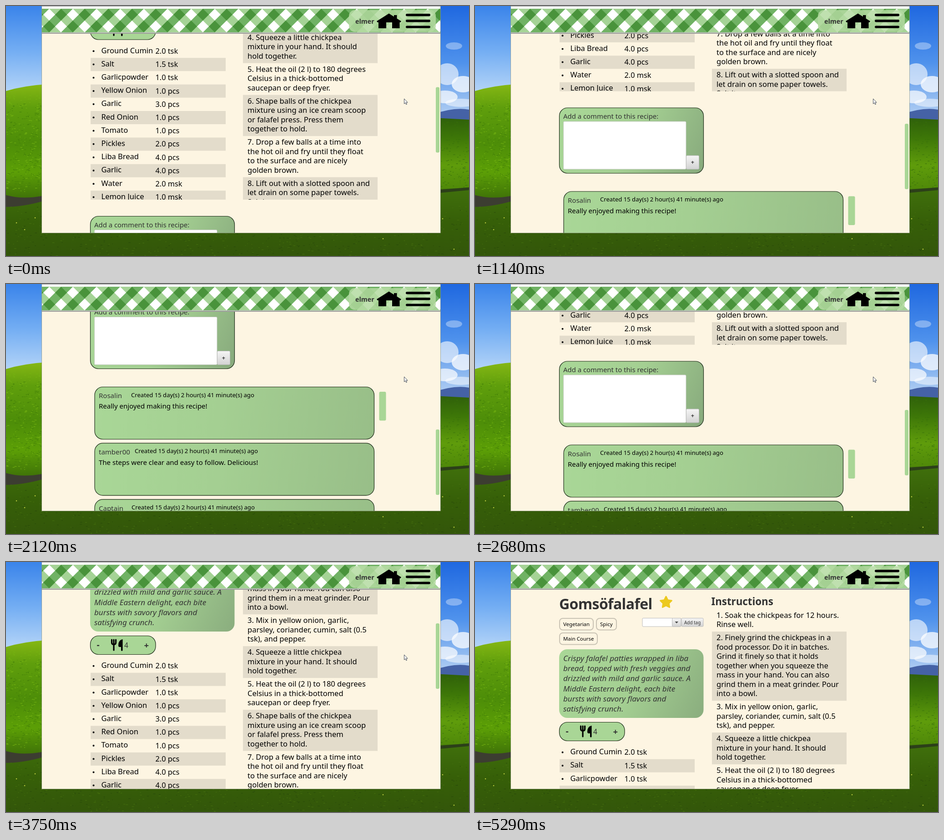
Recreate the animation shown at these times as an HTML page. Size 1018x550 px, loop 6.1 s.

```html
<!DOCTYPE html>
<html lang="en">
<head>
<meta charset="utf-8">
<title>Recipe page</title>
<style>
html, body { margin: 0; width: 100%; height: 100%; overflow: hidden; }
svg { display: block; }
text { font-family: "Noto Sans", "Open Sans", sans-serif; white-space: pre; }
.soft { fill: #333; }
.bold { font-weight: 700; fill: #333; }
.italic { font-style: italic; fill: #333; }
.card { stroke: #1c2a18; stroke-width: 1.2; }
.weave { mix-blend-mode: multiply; fill: none; stroke-width: 18.4; }
</style>
</head>
<body>
<svg id="stage" width="1018" height="550" viewBox="0 0 1018 550">
  <defs>
    <linearGradient id="skyL" x2="0" y2="1"><stop stop-color="#3a84ea"/><stop offset=".5" stop-color="#74aef3"/><stop offset="1" stop-color="#bcd9f8"/></linearGradient>
    <linearGradient id="skyR" x2="0" y2="1"><stop stop-color="#1f68e0"/><stop offset=".5" stop-color="#4f92ec"/><stop offset="1" stop-color="#b9d3f3"/></linearGradient>
    <linearGradient id="hillL" x2="0" y2="1"><stop stop-color="#86b814"/><stop offset=".2" stop-color="#5f9e0c"/><stop offset=".5" stop-color="#4d8d08"/><stop offset=".75" stop-color="#5c9f06"/><stop offset="1" stop-color="#3c6d08"/></linearGradient>
    <linearGradient id="hillR" x2="0" y2="1"><stop stop-color="#2f600a"/><stop offset=".25" stop-color="#3d7608"/><stop offset=".6" stop-color="#5f9c0b"/><stop offset="1" stop-color="#4a8208"/></linearGradient>
    <linearGradient id="field" x2="0" y2="1"><stop stop-color="#40700c"/><stop offset=".5" stop-color="#365f08"/><stop offset="1" stop-color="#33560a"/></linearGradient>
    <linearGradient id="button" x2="0" y2="1"><stop stop-color="#f5f5f5"/><stop offset="1" stop-color="#d3d3d3"/></linearGradient>
    <clipPath id="view"><path d="M79 61H955V499H79z"/></clipPath>
    <clipPath id="lists"><path d="M79 0H955V745.5H79z"/></clipPath>
  </defs>
  <g id="desk"></g>
  <path d="M79 0H955V499H79z" fill="#fdf5e2"/>
  <g clip-path="url(#view)">
    <g id="page"></g>
    <rect id="thumb" x="945" width="8" height="144" rx="3" fill="#a9d696"/>
  </g>
  <g id="header"></g>
  <path d="M78.5 0V499.5H955.5V0" fill="none" stroke="#8d9682" stroke-opacity=".7"/>
  <path id="cursor" d="M0 0V11.2L2.6 8.8L4.3 12.8L6 12L4.3 8.2H7.6z" fill="#fff" stroke="#333a48" stroke-width=".9"/>
</svg>
<script>
const $ = id => document.getElementById(id);
const text = (x, y, size, str, cls = '', more = '') =>
  `<text x="${x}" y="${y}" font-size="${size}" class="${cls}" ${more}>${str}</text>`;
const box = (x, y, w, h, r, fill, more = '') =>
  `<rect x="${x}" y="${y}" width="${w}" height="${h}" rx="${r}" fill="${fill}" ${more}/>`;

let gradients = 0;
// Rounded card shaded from its top left to its bottom right corner
function card(x, y, w, h, r, dark, bend, more) {
  const id = 'shade' + gradients++;
  return `<linearGradient id="${id}" gradientUnits="userSpaceOnUse" x1="${x}" y1="${y}" x2="${x + w}" y2="${y + h}">
    <stop stop-color="#a9d797"/><stop offset="${bend}" stop-color="#a4cf92"/><stop offset="1" stop-color="${dark}"/>
    </linearGradient>` + box(x, y, w, h, r, `url(#${id})`, more);
}

function desk() {
  let seed = 7;
  const rnd = () => (seed = seed * 16807 % 2147483647) / 2147483647;
  const flecks = (n, x, y, w, h, color) => {
    let d = '';
    while (n--) d += `M${(x + rnd() * w).toFixed(1)} ${(y + rnd() * h).toFixed(1)}h${(1 + rnd() * 4).toFixed(1)}`;
    return `<path d="${d}" stroke="${color}" fill="none"/>`;
  };
  const puff = (x, y, rx, ry, o) => `<ellipse cx="${x}" cy="${y}" rx="${rx}" ry="${ry}" fill="#fff" opacity="${o}"/>`;
  return `<path d="M0 0H90V200H0z" fill="url(#skyL)"/><path d="M940 0H1018V250H940z" fill="url(#skyR)"/>`
    + puff(985, 88, 18, 8, .35) + puff(970, 150, 25, 24, .6) + puff(1005, 172, 25, 18, .75)
    + puff(965, 200, 28, 14, .7) + puff(1000, 213, 34, 9, .5)
    + `<path d="M940 238Q985 222 1018 228V270H940z" fill="#4562a6"/>
      <path d="M0 187Q40 175 90 172V430H0z" fill="url(#hillL)"/>
      <path d="M940 246L1018 250V420H940z" fill="url(#hillR)"/>
      <path d="M0 418Q45 430 90 418V410H940V403L1018 400V550H0z" fill="url(#field)"/>
      <path d="M0 416Q35 426 79 418V430Q35 442 0 442z" fill="#3c3d31"/>
      <path d="M955 404L1018 399V405L955 411z" fill="#2c3f19"/>`
    + flecks(220, 0, 215, 78, 200, '#437f08') + flecks(160, 0, 190, 78, 220, '#76b512')
    + flecks(120, 955, 255, 62, 145, '#38700a') + flecks(420, 0, 440, 1018, 110, '#28490a')
    + flecks(420, 0, 440, 1018, 110, '#456f0e')
    + [[23, 477], [41, 492], [64, 466], [960, 468], [829, 512], [985, 535]].map(([x, y]) =>
      `<circle cx="${x}" cy="${y}" r="1.3" fill="#b7c83d"/>`).join('');
}

function header() {
  // One period of the diagonal check is as wide as the band is high
  const period = 52;
  let down = '', up = '';
  for (let x = -period; x < 960; x += period) {
    down += `M${x + 15} -14l80 80`;
    up += `M${x + 69} -14l-80 80`;
  }
  const bar = y => box(879, y, 54, 5.4, 2.7, '#000');
  return `<path d="M79 0H955V59H79z" fill="#fff"/><path d="M79 0H955V1H79z" fill="#8c8c8c"/>
    <svg x="79" y="6" width="876" height="${period}">
      <path class="weave" d="${down}" stroke="#a5d396"/><path class="weave" d="${up}" stroke="#70b264"/>
    </svg>
    <path d="M79 58.5H955V61H79z" fill="#9b9d99"/>`
    + box(754, 9, 191, 48, 13, '#b4dba2', 'opacity=".85"')
    + text(768, 38.5, 14.3, 'elmer', 'bold')
    + `<path d="M815 33.5L842 16.5L853 23.5V20H859.5V27.5L869 33.5L867 36H865.5V49H849V36H836V49H819V36H817z"/>`
    + bar(17) + bar(30) + bar(43.4);
}

const ingredients = ['Ground Cumin|2.0 tsk', 'Salt|1.5 tsk', 'Garlicpowder|1.0 tsk', 'Yellow Onion|1.0 pcs',
  'Garlic|3.0 pcs', 'Red Onion|1.0 pcs', 'Tomato|1.0 pcs', 'Pickles|2.0 pcs', 'Liba Bread|4.0 pcs',
  'Garlic|4.0 pcs', 'Water|2.0 msk', 'Lemon Juice|1.0 msk'];
const steps = [
  '1. Soak the chickpeas for 12 hours.|Rinse well.',
  '2. Finely grind the chickpeas in a|food processor. Do it in batches.|Grind it finely so that it holds|together when you squeeze the|mass in your hand. You can also|grind them in a meat grinder. Pour|into a bowl.',
  '3. Mix in yellow onion, garlic,|parsley, coriander, cumin, salt (0.5|tsk), and pepper.',
  '4. Squeeze a little chickpea|mixture in your hand. It should|hold together.',
  '5. Heat the oil (2 l) to 180 degrees|Celsius in a thick-bottomed|saucepan or deep fryer.',
  '6. Shape balls of the chickpea|mixture using an ice cream scoop|or falafel press. Press them|together to hold.',
  '7. Drop a few balls at a time into|the hot oil and fry until they float|to the surface and are nicely|golden brown.',
  '8. Lift out with a slotted spoon and|let drain on some paper towels.|Salt it.'];
const intro = 'Crispy falafel patties wrapped in liba|bread, topped with fresh veggies and|drizzled with mild and garlic sauce. A|Middle Eastern delight, each bite|bursts with savory flavors and|satisfying crunch.';
const comments = [['Rosalin', 275, 'Really enjoyed making this recipe!'],
  ['tamber00', 283, 'The steps were clear and easy to follow. Delicious!'], ['Captain', 276, '']];

function lists() {
  const stripe = '#e3dccb';
  let out = '';
  ingredients.forEach((row, i) => {
    const y = 404.5 + 29.2 * i, [name, amount] = row.split('|');
    if (i % 2) out += box(186, y, 297, 29, 0, stripe);
    out += `<circle cx="192.5" cy="${y + 14.3}" r="2"/>`
      + text(209.5, y + 18.6, 16.5, name) + text(328.5, y + 19.9, 16.3, amount);
  });
  let y = 103.7;
  steps.forEach((step, i) => {
    const lines = step.split('|'), h = 20.55 * lines.length + 8.3;
    if (i % 2) out += box(521, y, 296, h, 0, stripe);
    lines.forEach((line, k) => out += text(531, y + 18.9 + 20.55 * k, 16.55, line));
    y += h;
  });
  return `<g clip-path="url(#lists)">${out}</g>`;
}

function page() {
  const tag = (x, y, w, str) => box(x + 1, y + 1, w - 2, 25.5, 7, 'none', 'stroke="#c9c3b4" stroke-width="2"')
    + text(x + 9, y + 18, 11.4, str);
  let star = '';
  for (let i = 0; i < 10; i++) {
    const a = i * Math.PI / 5, r = i % 2 ? 6.6 : 13;
    star += `${420 + r * Math.sin(a)},${89 - r * Math.cos(a)} `;
  }
  const grey = 'stroke="#bcbcbc"';
  let out = text(185, 104, 32, 'Gomsöfalafel', 'bold', 'letter-spacing="-.6"')
    + `<polygon points="${star}" fill="#ecc91f" stroke="#ecc91f" stroke-width="3" stroke-linejoin="round"/>`
    + text(519.5, 94.5, 22.3, 'Instructions', 'bold')
    + tag(185, 123, 76, 'Vegetarian') + tag(266, 123, 46, 'Spicy') + tag(185, 155, 85, 'Main Course')
    + box(368, 123.5, 85, 18.5, 2, '#fff', grey) + box(433.5, 123.5, 19.5, 18.5, 2, 'url(#button)', grey)
    + '<path d="M439.5 131H447L443.2 135z" fill="#444"/>'
    + box(454, 123.5, 48, 18.5, 2, 'url(#button)', grey) + text(460, 136.7, 9.9, 'Add tag', 'soft')
    + card(185, 192, 317.5, 151, 18, '#8aad7e', .5);
  intro.split('|').forEach((line, i) => out += text(194, 217.6 + 22.3 * i, 17, line, 'italic'));
  out += box(185.5, 352.5, 143.5, 41, 18, '#a9d696', 'class="card"')
    + text(199.5, 379, 19, '-', 'bold') + text(303.5, 379.5, 18.5, '+', 'bold') + text(260, 379, 15.5, '4', 'soft')
    + `<path d="M232.5 361V367Q232.5 371.5 237 371.5T241.5 367V361M237 361V384" fill="none" stroke="#000" stroke-width="3.2" stroke-linecap="round"/>
      <path d="M256.5 360V384.5Q254.8 387 253 384.5V377H249.5Q247 377 247 373Q247 362 256.5 360z"/>`
    + lists()
    + card(185.5, 782, 317, 144, 18, '#87a97c', .5, 'class="card"')
    + text(194, 806, 14.9, 'Add a comment to this recipe:', 'soft')
    + box(194.5, 812, 269.5, 105, 2, '#fff', 'stroke="#c6cbc3"')
    + box(464.5, 887, 28, 30, 2, 'url(#button)', grey)
    + text(478.5, 906, 12, '+', 'bold', 'text-anchor="middle"')
    + box(820.5, 976.5, 15, 63.5, 3, '#a9d696');
  comments.forEach(([name, x, words], i) => {
    const y = 966 + 123.7 * i;
    out += card(195, y, 614.5, 115, 18, '#98be88', .45, 'class="card"')
      + text(204, y + 24.8, 15, name, 'soft')
      + text(x, y + 22, 13.1, 'Created 15 day(s) 2 hour(s) 41 minute(s) ago')
      + text(204, y + 47.5, 15, words);
  });
  return out;
}

$('desk').innerHTML = desk();
$('header').innerHTML = header();
$('page').innerHTML = page();

// [time, scroll offset]
const scrolls = [[0, 319.5], [120, 327], [270, 358], [390, 402], [510, 437], [630, 452.5], [900, 480], [1020, 533],
  [1140, 558], [1700, 588], [1820, 655], [1970, 718], [2120, 739.5], [2400, 720], [2530, 668], [2680, 612],
  [2800, 588], [3080, 510], [3200, 417], [3320, 352], [3440, 322], [3750, 190], [3870, 60], [4020, 6],
  [4140, 2], [4260, 0]];
// [time, x, y]
const moves = [[0, 875.5, 204], [4720, 883, 227], [4870, 925, 354], [5020, 952, 470], [5140, 966, 530]];
const at = (track, t) => track.findLast(step => step[0] <= t);
const show = (id, on) => $(id).setAttribute('visibility', on ? 'visible' : 'hidden');

function frame() {
  const t = performance.now() % 6100;
  const scroll = at(scrolls, t)[1], [, x, y] = at(moves, t);
  $('page').setAttribute('transform', `translate(0 ${-scroll})`);
  $('thumb').setAttribute('y', 71 + .3367 * scroll);
  $('cursor').setAttribute('transform', `translate(${x} ${y})`);
  show('thumb', t < 5140);
  show('cursor', t < 5290);
  requestAnimationFrame(frame);
}
frame();
</script>
</body>
</html>
```
